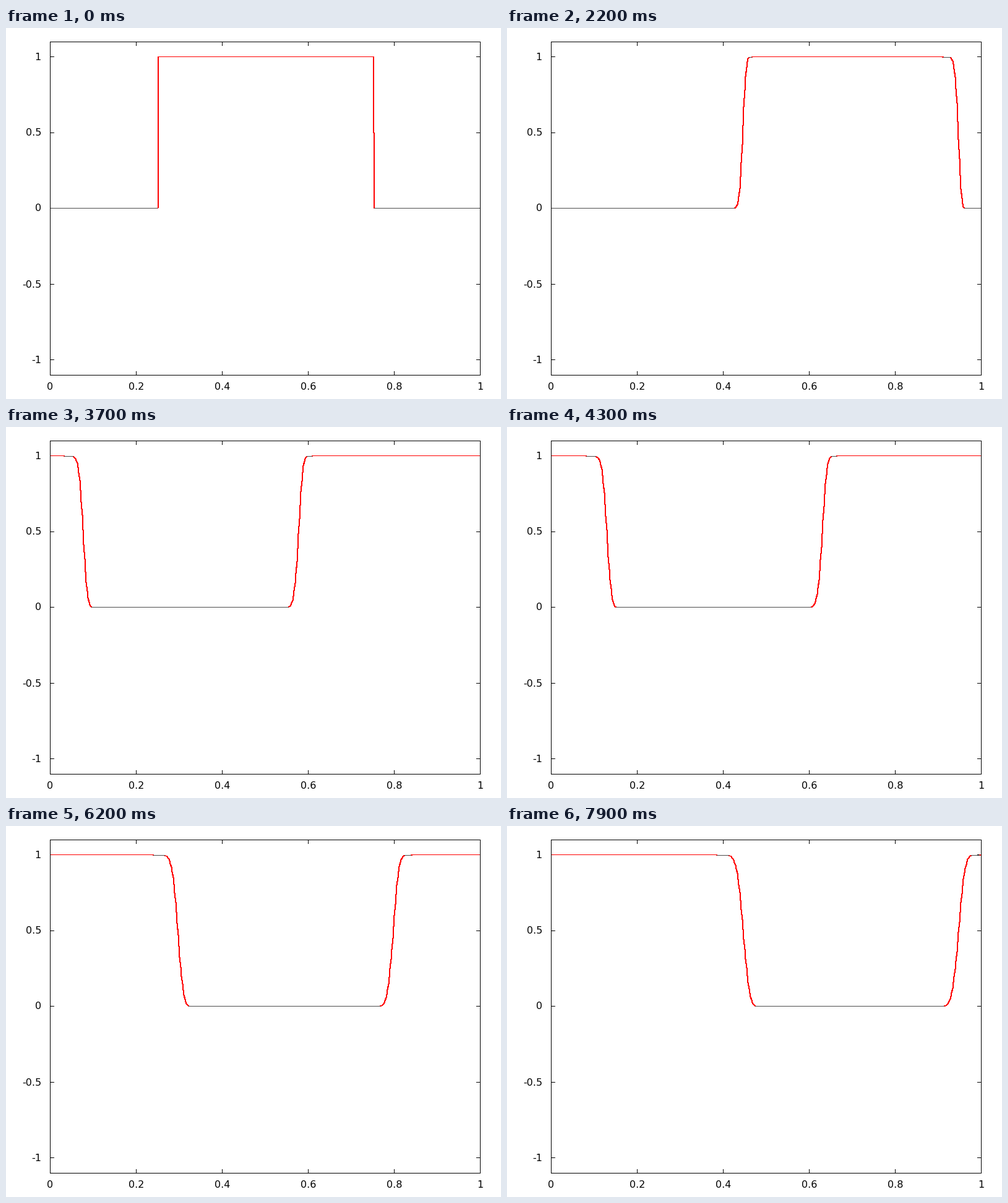
Animation of 800x600 px, one loop 8000 ms. Source, as a matplotlib script:

```python
import numpy as np
import matplotlib.pyplot as plt
from matplotlib.animation import FuncAnimation

W, H, DPI = 800, 600, 100
LEFT, RIGHT, TOP, BOTTOM = 71, 766, 22, 561
FRAMES, INTERVAL = 80, 100
CELLS, COURANT, STEPS = 512, 0.9, 5
PX = 72 / DPI

fig = plt.figure(figsize=(W / DPI, H / DPI), dpi=DPI, facecolor="white")
ax = fig.add_axes([0, 0, 1, 1])
ax.set_xlim(0, W)
ax.set_ylim(H, 0)
ax.axis("off")


def col(x):
    return np.floor(LEFT + (RIGHT - LEFT) * x + 0.5)


def row(y):
    return np.ceil(np.round(291 - 245 * y, 4))


def stroke(xs, ys, color, z):
    """One-pixel polyline through pixel centres."""
    line, = ax.plot(np.asarray(xs) + 0.5, np.asarray(ys) + 0.5, color=color,
                    lw=PX, antialiased=False, snap=False, zorder=z,
                    solid_capstyle="projecting", solid_joinstyle="round")
    return line


def label(x, y, text, align):
    ax.text(x, y, text, ha=align, va="baseline", family="DejaVu Sans",
            fontsize=16 * PX, color="black")


def advect():
    """First-order upwind transport of a square pulse on a periodic grid."""
    i = np.arange(CELLS)
    u = ((i > CELLS // 4) & (i <= 3 * CELLS // 4)).astype(float)
    states = []
    for _ in range(FRAMES):
        states.append(np.round(u, 6))
        for _ in range(STEPS):
            u = u - COURANT * (u - np.roll(u, 1))
    return states


for v in (0, 0.2, 0.4, 0.6, 0.8, 1):
    c = col(v)
    stroke([c, c], [TOP, TOP + 6], "black", 1)
    stroke([c, c], [BOTTOM - 6, BOTTOM], "black", 1)
    label(c + 0.5, 585, f"{v:g}", "center")

for v in (-1, -0.5, 0, 0.5, 1):
    r = row(v)
    stroke([LEFT, LEFT + 6], [r, r], "black", 1)
    stroke([RIGHT - 6, RIGHT], [r, r], "black", 1)
    label(57, r + 5.5, f"{v:g}", "right")

stroke([LEFT, RIGHT, RIGHT, LEFT, LEFT],
       [TOP, TOP, BOTTOM, BOTTOM, TOP], "black", 5)

xs = col(np.arange(CELLS) / (CELLS - 1))
states = advect()
curve = stroke(xs, row(states[0]), "#ff0000", 3)
flat = stroke(xs, row(states[0]), "#4c4c4c", 4)
flat.set_solid_capstyle("butt")


def draw(n):
    ys = row(states[n])
    curve.set_ydata(ys + 0.5)
    # level stretches at the base and just under the crest are dark
    level = (ys == row(0)) | (ys == row(1) + 1)
    flat.set_ydata(np.where(level, ys, np.nan) + 0.5)
    # keep only runs that stay on one row
    jump = np.append(np.abs(np.diff(ys)) > 100, False)
    if jump.any():
        flat.set_ydata(np.where(level & ~jump, ys, np.nan) + 0.5)
    return curve, flat


anim = FuncAnimation(fig, draw, frames=FRAMES, interval=INTERVAL,
                     init_func=lambda: draw(0), repeat=True, repeat_delay=0,
                     blit=False)
plt.show()
```
